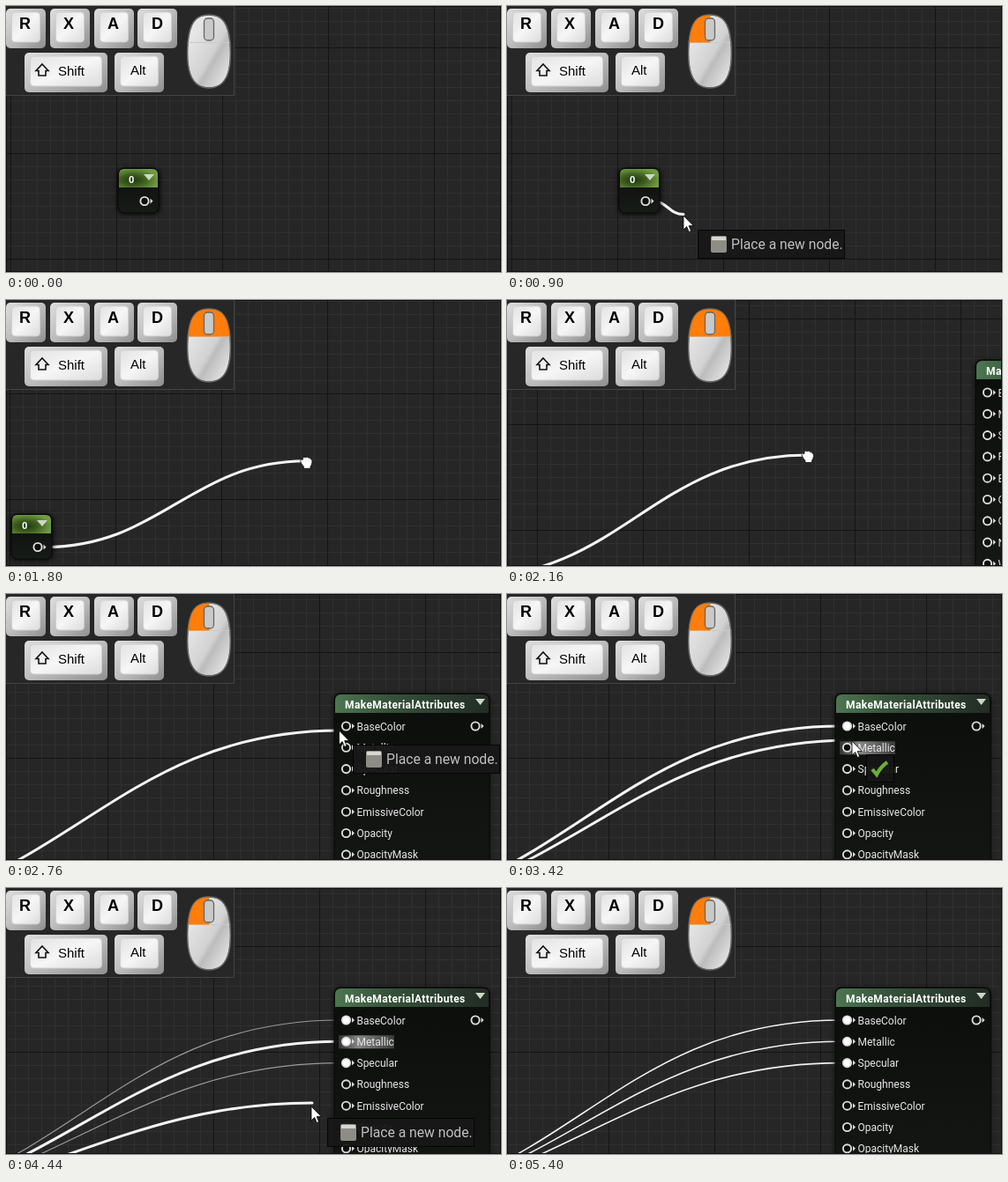
Write an HTML page that moves like this. It is 561 px wide and 302 px high and loops after 5.46 s.

```html
<!DOCTYPE html>
<html lang="en">
<head>
<meta charset="utf-8">
<title>Node wiring</title>
<style>
html, body { margin: 0; width: 100%; height: 100%; overflow: hidden; background: #262626; }
svg { display: block; }
text { font-family: Roboto, Inter, sans-serif; fill: #e8e8e8; font-size: 12px; }
.key { font-family: "Liberation Sans", Arial, sans-serif; font-size: 15px; fill: #000; }
.big { font-size: 18px; font-weight: bold; }
.title { font-weight: bold; letter-spacing: .38px; fill: #fff; }
.tip { font-size: 15.7px; fill: #c0c0c0; }
.wire { fill: none; }
</style>
</head>
<body>
<svg width="561" height="302" viewBox="0 0 561 302">
<defs>
  <pattern id="grid" width="120" height="120" patternUnits="userSpaceOnUse">
    <path id="minor" stroke="#303030"/>
    <path d="M.5 0V120M0 .5H120" stroke="#141414"/>
  </pattern>
  <linearGradient id="cap" x2="1" y2="1">
    <stop stop-color="#dedede"/><stop offset=".5" stop-color="#bdbdbd"/><stop offset="1" stop-color="#8f8f8f"/>
  </linearGradient>
  <linearGradient id="face" x2="1" y2="1">
    <stop stop-color="#e2e2e2"/><stop offset=".5" stop-color="#f6f6f6"/><stop offset="1" stop-color="#dcdcdc"/>
  </linearGradient>
  <linearGradient id="shell" x2="1" y2="1">
    <stop offset=".2" stop-color="#e6e6e6"/><stop offset=".55" stop-color="#d2d2d2"/>
    <stop offset=".62" stop-color="#bcbcbc"/><stop offset=".9" stop-color="#e4e4e4"/>
  </linearGradient>
  <radialGradient id="lime" cx=".36" cy=".6" r=".65">
    <stop stop-color="#22360f"/><stop offset=".45" stop-color="#3c5c1d"/><stop offset="1" stop-color="#719c42"/>
  </radialGradient>
  <linearGradient id="moss">
    <stop stop-color="#4c7650"/><stop offset=".35" stop-color="#36523a"/><stop offset="1" stop-color="#222c24"/>
  </linearGradient>
  <linearGradient id="dark" x2="0" y2="1">
    <stop stop-color="#0c0e0c"/><stop offset="1" stop-color="#171b17"/>
  </linearGradient>
  <linearGradient id="glow">
    <stop stop-color="#fff" stop-opacity=".15"/><stop offset=".35" stop-color="#fff" stop-opacity=".5"/>
    <stop offset="1" stop-color="#fff" stop-opacity=".18"/>
  </linearGradient>
  <filter id="soft" x="-30%" y="-30%" width="160%" height="160%"><feGaussianBlur stdDeviation="2.5"/></filter>
  <path id="body" d="M230 10C246 10 252 20 254 42C256 70 252 93 230 93S204 70 206 42C208 20 214 10 230 10Z"/>
  <clipPath id="bodyClip"><use href="#body"/></clipPath>
  <path id="arrow" d="M6.5 -3L9.5 0L6.5 3Z" fill="#ddd"/>
</defs>

<rect width="561" height="302" fill="url(#grid)"/>
<g id="wires" stroke-linecap="round"></g>
<g id="world">
  <rect x="126" y="184" width="49" height="53" rx="8" filter="url(#soft)" opacity=".7"/>
  <rect x="127" y="184" width="46" height="51" rx="7" fill="url(#dark)" stroke="#080808"/>
  <path d="M128 206V191Q128 185 134 185H166Q172 185 172 191V206Z" fill="url(#lime)"/>
  <text x="139" y="201" class="title" style="font-size:11px">0</text>
  <path d="M156 191H168L162 198Z" fill="#cfd6c8"/>
  <g id="panel" transform="translate(742 -26)">
    <rect x="-1" width="178" height="300" rx="8" filter="url(#soft)" opacity=".7"/>
    <rect width="176" height="298" rx="7" fill="url(#dark)" fill-opacity=".93" stroke="#080808"/>
    <path d="M1 22V8Q1 1 8 1H168Q175 1 175 8V22Z" fill="url(#moss)"/>
    <text x="12" y="17" class="title">MakeMaterialAttributes</text>
    <path d="M160 6H171L165.500 13Z" fill="#cfd6c8"/>
  </g>
</g>

<g id="placeTip">
  <rect x=".5" y=".5" width="166" height="32" fill="#181818" fill-opacity=".95" stroke="#050505"/>
  <rect x="15" y="7" width="18" height="19" rx="2" fill="#8d8d86"/>
  <path d="M16 8H32V12H16Z" fill="#d6d6d0"/>
  <text x="38" y="22" class="tip">Place a new node.</text>
</g>
<g id="okTip">
  <rect x=".5" y=".5" width="31" height="31" fill="#161616" fill-opacity=".95" stroke="#050505"/>
  <path d="M7 17L12 23C15 17 18 13 24 9" fill="none" stroke="#6fae35" stroke-width="4"/>
</g>
<path id="pointer" d="M0 0V16L3.700 12.500L6.200 18.500L8.600 17.500L6.200 11.600H11.300Z" fill="#fff" stroke="#000" stroke-width=".8"/>
<path id="hand" d="M-7 -2Q-6 -4 -4 -3V-5Q-2.500 -7 -1 -5.500Q1 -7 2.500 -5Q4.500 -6 5 -3.500Q7 -3 6.500 0Q6 3 4.500 5V7H-3V5Q-6 2 -7 -2Z" fill="#fff" stroke="#111" stroke-width=".8"/>
<rect x=".5" y=".5" width="560" height="301" fill="none" stroke="#111"/>

<rect width="259" height="102" fill="#272727"/>
<path d="M0 101.500H258.500V0" fill="none" stroke="#444"/>
<g id="keys"></g>
<path d="M41 66L48 73.500H45V79H37V73.500H34Z" fill="#eee" stroke="#111" stroke-width="1.600"/>
<use href="#body" fill="url(#shell)" stroke="#555" stroke-width="1.500"/>
<g clip-path="url(#bodyClip)">
  <path d="M206 41.500H255" stroke="#cacaca"/>
  <rect id="left" x="206" y="10" width="24.500" height="31.500" fill="#ff7d0a"/>
  <rect id="right" x="229.500" y="10" width="26" height="31.500" fill="#ff7d0a"/>
</g>
<use href="#body" fill="none" stroke="#666"/>
<rect x="224.500" y="14" width="11" height="25" rx="4" fill="#c9c9c9" stroke="#666" stroke-width="1.300"/>
</svg>

<script>
const $ = id => document.getElementById(id);
const add = (parent, html) => parent.insertAdjacentHTML('beforeend', html);
const show = (id, on) => $(id).style.display = on ? '' : 'none';
const move = (id, x, y) => $(id).setAttribute('transform', `translate(${x} ${y})`);
const within = (t, ...spans) => spans.some(([a, b]) => t >= a && t < b);

const LOOP = 5460, STEP = 60, ROW = 24.3;
const rows = ['BaseColor', 'Metallic', 'Specular', 'Roughness', 'EmissiveColor', 'Opacity',
  'OpacityMask', 'Normal', 'WorldPositionOffset', 'WorldDisplacement', 'TessellationMultiplier'];

// Tracks hold [time, x, y] and are linear between keys.
const panTrack = [[1380, 0, 0], [1500, -46, 30], [2160, -211, 94], [2580, -370, 139]];
const cursorTrack = [[60, 528, 79], [600, 158, 220], [780, 158, 220], [900, 200, 238], [1020, 280, 248],
  [1200, 380, 220], [1380, 344, 194], [1500, 340, 190], [2160, 341, 177.5], [2580, 341, 173],
  [2640, 343, 172], [2760, 377.5, 155], [2880, 388, 150], [3240, 390, 152], [3420, 391, 167],
  [3600, 389, 174], [3780, 389, 175], [3960, 389, 198], [4200, 388, 199], [4440, 346, 248],
  [4620, 345, 254], [4740, 345, 254], [5220, 565, 300]];
const tipTrack = [[2760, 15.5, 16], [3420, 16, 15], [4440, 18, 13]];
const lagTrack = [[2160, 0, -1.5], [2760, 0, 0], [3420, 0, -1], [4440, 1, -4]];
const connectAt = [3000, 3660, 4200];

function at(track, t) {
  const i = track.findIndex(k => k[0] > t);
  if (i < 0) return track.at(-1).slice(1);
  if (!i) return track[0].slice(1);
  const a = track[i - 1], b = track[i], u = (t - a[0]) / (b[0] - a[0]);
  return [a[1] + (b[1] - a[1]) * u, a[2] + (b[2] - a[2]) * u];
}

function curve(x0, y0, x1, y1) {
  const c = (Math.abs(x1 - x0) + Math.abs(y1 - y0)) / 3;
  return `M${x0} ${y0}C${x0 + c} ${y0} ${x1 - c} ${y1} ${x1} ${y1}`;
}

function pin(x, y, id = '') {
  return `<g transform="translate(${x} ${y})"><circle ${id && `id="${id}"`} r="4.6" fill="#0c0e0c" stroke="#ddd" stroke-width="1.9"/><use href="#arrow"/></g>`;
}

function key(x, y, w, label, tx, ty, cls = '') {
  add($('keys'), `<rect x="${x}" y="${y}" width="${w}" height="45" rx="5" fill="url(#cap)"/>
    <rect x="${x + 6.5}" y="${y + 4}" width="${w - 13}" height="34" rx="4" fill="url(#face)" stroke="#cfcfcf"/>
    <text x="${tx}" y="${ty}" class="key ${cls}">${label}</text>`);
}

let lines = '';
for (let p = 15; p < 120; p += 15) lines += `M${p}.5 0V120M0 ${p}.5H120`;
$('minor').setAttribute('d', lines);

[['R', 0, 15], ['X', 50, 65], ['A', 100, 115], ['D', 149, 165]].forEach(([c, x, tx]) => key(x, 3, 45, c, tx, 26, 'big'));
key(21, 53, 94, 'Shift', 59, 79);
key(123, 53, 56, 'Alt', 141, 78);

add($('world'), pin(157, 221.5));
rows.forEach((name, i) => {
  const y = 37 + ROW * i;
  if (i < 3) add($('panel'), `<rect id="glow${i}" x="5" y="${y - 7}" width="63" height="15" fill="url(#glow)"/>`);
  add($('panel'), pin(13.5, y, 'pin' + i) + `<text x="25.500" y="${y + 4.5}">${name}</text>`);
});
add($('panel'), pin(160, 37));
for (let i = 0; i < 4; i++) add($('wires'), `<path id="wire${i}" class="wire"/>`);

function wire(i, on, x, y, pan, width, color) {
  const el = $('wire' + i);
  show('wire' + i, on);
  el.setAttribute('d', curve(165 + pan[0], 221.5 + pan[1], x, y));
  el.setAttribute('stroke-width', width);
  el.setAttribute('stroke', color);
}

function draw(now) {
  const t = Math.floor(now % LOOP / STEP) * STEP;
  const pan = at(panTrack, t).map(Math.round), [cx, cy] = at(cursorTrack, t);
  const panning = within(t, [1440, 2640]), dragging = within(t, [840, 4800]);
  const onPin = within(t, [2820, 3240], [3360, 3780], [3900, 4260]);

  $('grid').setAttribute('patternTransform', `translate(${pan[0] + 5} ${pan[1] + 47})`);
  move('world', ...pan);

  const thick = [[3000, 3900], [3660, 4860], [0, 0]];
  const hovered = [[2820, 3300], [3360, 4860], [3900, 4260]];
  connectAt.forEach((start, i) => {
    const on = t >= start, bold = within(t, thick[i]), dim = within(t, [3900, 4860]);
    wire(i, on, 748 + pan[0], 11 + ROW * i + pan[1], pan,
      bold ? 3 : dim ? 1.2 : 1.6, bold ? '#f4f4f4' : dim ? '#9a9a9a' : '#f0f0f0');
    $('pin' + i).setAttribute('fill', on ? '#fff' : '#0c0e0c');
    show('glow' + i, within(t, hovered[i]));
  });
  const lag = at(lagTrack, t);
  wire(3, dragging, cx + lag[0], cy + lag[1], pan, 3, '#f4f4f4');

  const off = at(tipTrack, t), tip = [Math.round(cx + off[0]), Math.round(cy + off[1])];
  show('placeTip', dragging && !panning && !onPin);
  show('okTip', dragging && onPin);
  move('placeTip', ...tip);
  move('okTip', ...tip);
  show('pointer', within(t, [60, 5220]) && !panning);
  show('hand', panning);
  move('pointer', cx, cy);
  move('hand', cx, cy);

  show('left', dragging || t >= 5400);
  show('right', panning || within(t, [3000, 3120], [3660, 3780], [4200, 4320]));
}

const begin = performance.now();
function frame() {
  draw(performance.now() - begin);
  requestAnimationFrame(frame);
}
frame();
</script>
</body>
</html>
```
